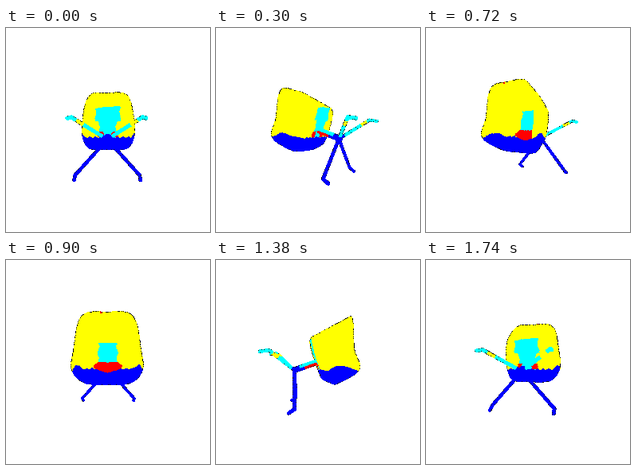
Animation, 256 px wide and 256 px high, one loop 1800 ms. Source, as an HTML page with a canvas:

```html
<!DOCTYPE html>
<html lang="en">
<head>
<meta charset="utf-8">
<title>Rotating chair</title>
<style>
html, body { margin: 0; width: 100%; height: 100%; overflow: hidden; background: #fff; }
canvas { display: block; width: 256px; height: 256px; image-rendering: pixelated; }
</style>
</head>
<body>
<canvas id="stage" width="256" height="256"></canvas>
<script>
const SIZE = 256, MID_X = 127.3, MID_Y = 128, CAMERA = 254;
const STEP_MS = 60, STEPS = 30, START_ANGLE = -0.02;
// Colours as ABGR
const YELLOW = 0xff00ffff, CYAN = 0xffffff00, BLUE = 0xffff0000, RED = 0xff0000ff;
const BLACK = 0xff000000, WHITE = 0xffffffff;

const ctx = document.getElementById('stage').getContext('2d');
const image = ctx.createImageData(SIZE, SIZE);
const pixels = new Uint32Array(image.data.buffer);
const depth = new Float32Array(SIZE * SIZE);

// Half outlines of the shell, from top centre to bottom centre
const RIM = [[0, -54, -37], [21, -53.5, -37], [31, -43, -37], [36, -15, -37],
             [37, 8, -42], [26, 24, -20], [0, 26, -17]];
const FLOOR = [[0, -29, 9], [17, -29, 9], [25, -22, 8], [27, -5, 3],
               [26, 12, -3], [18, 20, -6], [0, 21, -6]];
const CENTRE = [0, -4, 2];
const HUB = [0, 10, 29];
const BULGE = 2.5;

const mix = (a, b, t) => a.map((v, i) => v + (b[i] - v) * t);

// Catmull-Rom point on an outline, u counted in segments
function curve(points, u) {
  const i = Math.min(Math.floor(u), points.length - 2), t = u - i;
  const at = k => points[Math.max(0, Math.min(points.length - 1, k))];
  const [a, b, c, d] = [at(i - 1), at(i), at(i + 1), at(i + 2)];
  return b.map((p, k) => p + 0.5 * t * (c[k] - a[k]
    + t * (2 * a[k] - 5 * p + 4 * c[k] - d[k]
    + t * (3 * (p - c[k]) + d[k] - a[k]))));
}

function isBlue(x, y, z) {
  return y > 5.8 + 2.6 * Math.cos((z + 5) * 0.16) + 0.8 * Math.sin(x * 0.9);
}

function outerColour(x, y, z) {
  const wobble = Math.sin(y * 0.35);
  if (y > 1 && y < 8.5 && Math.abs(Math.abs(x) - 9) < 3 + wobble) return RED;
  if (isBlue(x, y, z)) return BLUE;
  const half = (y < -12 ? 15 : 11) + wobble;
  return y > -29 - x * 0.15 && Math.abs(x) < half ? CYAN : YELLOW;
}

function innerColour(x, y, z) {
  const ax = Math.abs(x), edge = Math.sin(y * 0.4);
  if (y > 0 && y < 13 - ax * 0.3 && ax < 12 + Math.min(y, 5) + edge) return RED;
  if (isBlue(x, y, z)) return BLUE;
  return y > -25 && y <= 2 && ax < 12 + edge ? CYAN : YELLOW;
}

function wallColour(x, y, z, t) {
  if (t > 0.96 && y < -52 && Math.abs(x - 6) < 1.5) return RED;
  return isBlue(x, y, z) ? BLUE : YELLOW;
}

// Shell as a flat list of x, y, z, colour
function buildShell() {
  const list = [], perSegment = 70, count = perSegment * (RIM.length - 1);
  for (let i = 0; i <= count; i++) {
    const rim = curve(RIM, i / perSegment), floor = curve(FLOOR, i / perSegment);
    for (const side of [-1, 1]) {
      for (let j = 0; j < 40; j++) {
        const [px, y, z] = mix(CENTRE, floor, j / 40), x = px * side;
        list.push(x, y, z, outerColour(x, y, z));
        list.push(x, y, z - 2, innerColour(x, y, z));
      }
      for (let j = 0; j <= 100; j++) {
        const t = j / 100, [px, y, z] = mix(floor, rim, t);
        const x = px * side * (1 + BULGE / 30 * Math.sin(Math.PI * t));
        list.push(x, y, z, wallColour(x, y, z, t));
      }
    }
  }
  return new Float64Array(list);
}
const shell = buildShell();

// Tubes: [from, to, radius, colour(t, below)]
const blue = () => BLUE;
const armColour = t => t < 0.17 ? BLUE : t > 0.7 && t < 0.9 ? YELLOW : CYAN;
const postColour = (t, below) =>
  t < 0.2 ? BLUE : !below ? CYAN : t < 0.42 ? BLUE : RED;
const tubes = [
  [[-5, 10, 29], [5, 10, 29], 2.8, blue],
  [[0, 9, 28], [0, 0, 2], 3.8, postColour]
];
for (const side of [-1, 1]) {
  const legKnee = [36 * side, 50, 28], armKnee = [35 * side, -13, 55];
  tubes.push(
    [HUB, legKnee, 2.1, blue],
    [legKnee, [36 * side, 54, 34], 2.1, blue],
    [HUB, armKnee, 2.1, armColour],
    [armKnee, [37 * side, -11.5, 64], 2, () => CYAN]
  );
}

function plot(x, y, z, colour) {
  const i = y * SIZE + x;
  if (z > depth[i]) {
    depth[i] = z;
    pixels[i] = colour;
  }
}

function drawShell(cos, sin) {
  for (let i = 0; i < shell.length; i += 4) {
    const x = shell[i], z = shell[i + 2];
    const near = z * cos - x * sin, scale = CAMERA / (CAMERA - near);
    plot(Math.round(MID_X + (x * cos + z * sin) * scale),
         Math.round(MID_Y + shell[i + 1] * scale), near, shell[i + 3]);
  }
}

function drawTube([from, to, radius, colour], cos, sin) {
  for (let k = 0; k <= 100; k++) {
    const t = k / 100, [x, y, z] = mix(from, to, t);
    const near = z * cos - x * sin, scale = CAMERA / (CAMERA - near);
    const cx = MID_X + (x * cos + z * sin) * scale, cy = MID_Y + y * scale;
    const r = radius * scale;
    for (let py = Math.ceil(cy - r); py <= cy + r; py++) {
      for (let px = Math.ceil(cx - r); px <= cx + r; px++) {
        const d = r * r - (px - cx) ** 2 - (py - cy) ** 2;
        if (d >= 0) plot(px, py, near + Math.sqrt(d), colour(t, py > cy));
      }
    }
  }
}

// Broken dark line where the figure meets the background
function drawOutline() {
  const edge = [];
  for (let i = SIZE; i < pixels.length - SIZE; i++) {
    if (pixels[i] === WHITE) continue;
    const open = [1, -1, SIZE, -SIZE].some(d => pixels[i + d] === WHITE);
    const noise = Math.abs(Math.sin(i * 12.9898) * 43758.5453) % 1;
    if (open && noise < (pixels[i] === YELLOW ? 0.5 : 0.25)) edge.push(i);
  }
  for (const i of edge) pixels[i] = BLACK;
}

function render(step) {
  const angle = START_ANGLE + step / STEPS * 2 * Math.PI;
  const cos = Math.cos(angle), sin = Math.sin(angle);
  pixels.fill(WHITE);
  depth.fill(-1e9);
  drawShell(cos, sin);
  for (const tube of tubes) drawTube(tube, cos, sin);
  drawOutline();
  ctx.putImageData(image, 0, 0);
}

let shown = -1;
const start = performance.now();
function tick() {
  const step = Math.floor((performance.now() - start) / STEP_MS) % STEPS;
  if (step !== shown) render(shown = step);
  requestAnimationFrame(tick);
}
tick();
</script>
</body>
</html>
```
